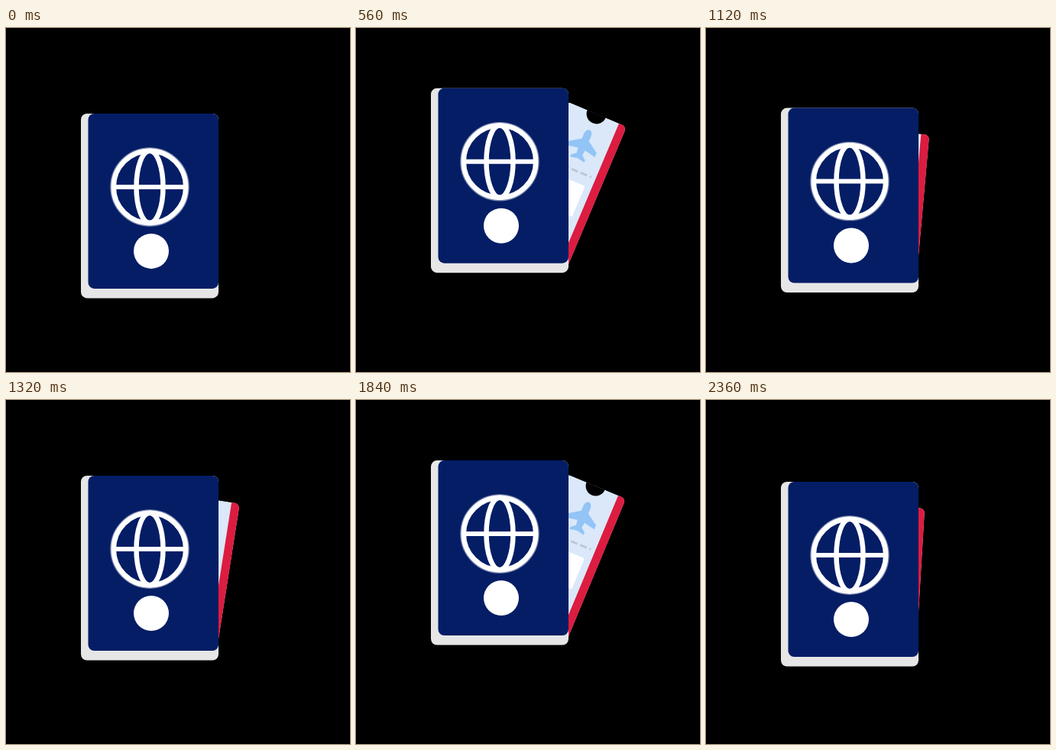
An HTML page for the animation above (2400 ms loop, 450 px wide and 450 px high).

```html
<!DOCTYPE html>
<html lang="en">
<head>
<meta charset="utf-8">
<title>Passport and ticket</title>
<style>
  @property --lift {
    syntax: "<number>";
    inherits: true;
    initial-value: 0;
  }
  html, body {
    margin: 0;
    width: 100%;
    height: 100%;
    overflow: hidden;
    background: #000;
  }
  svg {
    display: block;
    width: 100vw;
    height: 100vh;
    animation: lift 1200ms linear infinite;
  }
  .set { transform: translateY(calc(112px - 33.5px * var(--lift))); }
  .ticket { transform: translate(274px, 240.2px) rotate(calc(23deg * var(--lift))); }

  /* quick rise, steadier fall, short drop back to rest */
  @keyframes lift {
    0% { --lift: 0; animation-timing-function: cubic-bezier(.3, .67, .65, 1); }
    50% { --lift: 1; }
    53.333% { --lift: .985; animation-timing-function: cubic-bezier(.3, .22, .7, .7); }
    66.667% { --lift: .7; }
    86.667% { --lift: .33; }
    93.333% { --lift: .224; }
    96.667% { --lift: .149; animation-timing-function: step-end; }
    100% { --lift: 0; }
  }
</style>
</head>
<body>
<svg viewBox="0 0 450 450">
  <defs>
    <clipPath id="card"><rect x="-86" y="-206" width="86" height="202" rx="7"/></clipPath>
  </defs>
  <g class="set">
    <g class="ticket">
      <g clip-path="url(#card)">
        <rect x="-86" y="-206" width="86" height="206" fill="#dae8f9"/>
        <rect x="-11" y="-206" width="11" height="206" fill="#dc1c40"/>
        <path d="M-84 -127H-17" stroke="#bcc8d8" stroke-width="3" stroke-dasharray="9 4"/>
        <rect x="-68" y="-113" width="48" height="44" rx="3" fill="#fff"/>
        <path transform="translate(-43 -162)" fill="#93c4f6"
          d="M0 -21C4 -21 5 -16 5 -13V-7L20 3V9L5 6L4 13L10 18V21L0 19L-10 21V18L-4 13L-5 6L-20 9V3L-5 -7V-13C-5 -16 -4 -21 0 -21Z"/>
        <circle cx="-43" cy="-206" r="13"/>
      </g>
    </g>
    <rect x="98" width="180" height="241.5" rx="8" fill="#e6e6e6"/>
    <rect x="107.5" width="170.5" height="229" rx="8" fill="#041d65"/>
    <g transform="translate(188 96)" fill="none" stroke="#fff" stroke-width="6.5">
      <circle r="50.5" stroke="#7a86ad" stroke-width="2.5"/>
      <circle r="47.2"/>
      <ellipse rx="17.5" ry="47.2"/>
      <path d="M-47 0H47" stroke-width="6"/>
    </g>
    <circle cx="190" cy="180" r="23" fill="#fff"/>
  </g>
</svg>
</body>
</html>
```
